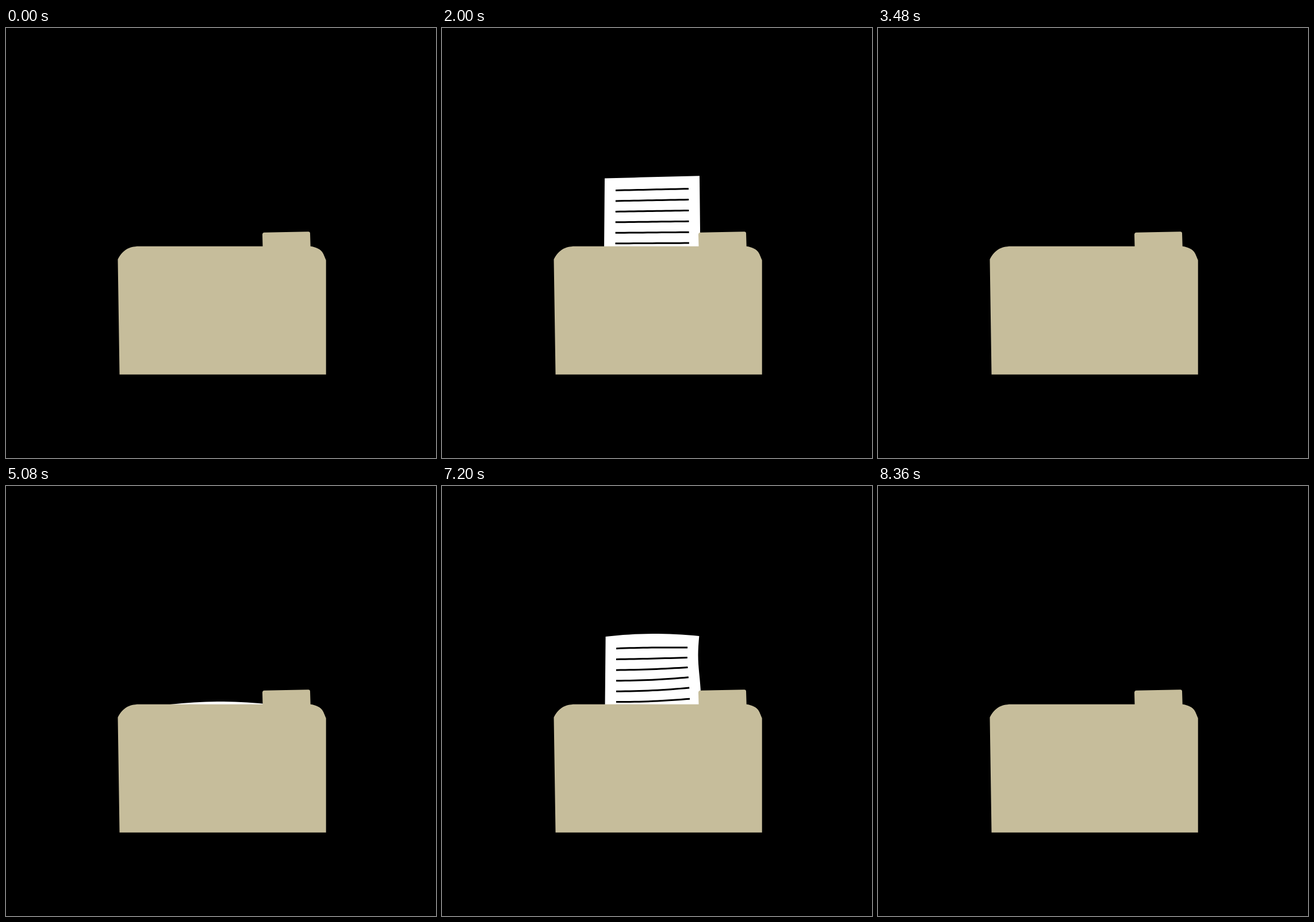
Write an HTML page with a canvas that moves like this. It is 748 px wide and 748 px high and loops after 9600 ms.

```html
<!DOCTYPE html>
<html lang="en">
<head>
<meta charset="utf-8">
<title>Folder</title>
<style>
html, body { margin: 0; width: 100%; height: 100%; overflow: hidden; background: #000; }
canvas { display: block; width: 748px; height: 748px; }
</style>
</head>
<body>
<canvas id="stage" width="748" height="748"></canvas>
<script>
const ctx = document.getElementById('stage').getContext('2d');
const LOOP = 9600, STEP = 40;
const HEIGHT = 215, LINES = 10, INSET = 0.116;
const RISE = 1900, LAUNCH = 2160, END = 3320;

const clamp = x => Math.max(0, Math.min(1, x));
const smooth = x => { x = clamp(x); return x * x * (3 - 2 * x); };
const mix = (a, b, k) => a + (b - a) * k;

// Each row of a sheet is a quadratic curve: x from left to right,
// y offset 0 at the left, bow in the middle, lift at the right.
function flatRow(v, s) {
  const k = smooth((s - 1000) / 840);
  const lift = -mix(2.6, 4.3, k) * Math.max(0, 1 - v / 145);
  const x = 285 - 2 * k;
  return { left: x - v * 0.008, right: x + mix(164, 165, k) + v * 0.011, bow: lift / 2, lift };
}

function curledRow(v, s) {
  const wave = Math.sin(v / 27 - 5.05 + s * 0.001);
  const curl = v < 180 ? Math.sin(Math.PI * v / 180) ** 2 : 0;
  return {
    left: 285.4 - 0.8 * smooth((s - 880) / 1280) - v * 0.009,
    right: 448 + 2.5 * wave,
    bow: -9.5 * Math.exp(-v / 25) + 1.5 * clamp(v / 80),
    lift: -1 - 7.2 * curl
  };
}

const sheets = [
  { start: 160, row: flatRow, low: 382, high: 261, power: 1.6,
    dx: -196, dy: -338, turn: -26, flight: 1370 },
  { start: 5040, row: curledRow, low: 384, high: 259, power: 1.5,
    dx: 209, dy: -319, turn: 40, flight: 1500 }
];

function pointAt(row, v, u) {
  return [mix(row.left, row.right, u), v + 2 * u * (1 - u) * row.bow + u * u * row.lift];
}

function traceRow(sheet, s, v, from, to) {
  const row = sheet.row(v, s);
  for (let i = 0; i <= 16; i++) ctx.lineTo(...pointAt(row, v, mix(from, to, i / 16)));
}

function traceEdge(sheet, s, u, from, to) {
  for (let i = 0; i <= 24; i++) {
    const v = mix(from, to, i / 24);
    ctx.lineTo(...pointAt(sheet.row(v, s), v, u));
  }
}

function drawSheet(sheet, s) {
  const rise = 1 - (1 - clamp(s / RISE)) ** sheet.power;
  const dip = 3 * smooth((s - RISE) / (LAUNCH - RISE));
  const top = mix(sheet.low, sheet.high, rise) + dip;
  const fly = smooth((s - LAUNCH) / sheet.flight) / smooth(800 / sheet.flight);
  const cx = 366, cy = HEIGHT / 2;

  ctx.save();
  ctx.translate(cx + sheet.dx * fly, top + cy + sheet.dy * fly);
  ctx.rotate(sheet.turn * fly * Math.PI / 180);
  ctx.translate(-cx, -cy);

  ctx.beginPath();
  traceRow(sheet, s, 0, 0, 1);
  traceEdge(sheet, s, 1, 0, HEIGHT);
  traceRow(sheet, s, HEIGHT, 1, 0);
  traceEdge(sheet, s, 0, HEIGHT, 0);
  ctx.closePath();
  ctx.fillStyle = '#fff';
  ctx.fill();

  ctx.strokeStyle = '#000';
  ctx.lineWidth = 3;
  for (let i = 0; i < LINES; i++) {
    ctx.beginPath();
    traceRow(sheet, s, 21.4 + 18.4 * i, INSET, 1 - INSET);
    ctx.stroke();
  }
  ctx.restore();
}

const folder = new Path2D(
  'M194.5 402.5C203 386 214 380 231 379.7L446.5 379.7L446 359.5Q446 356 449.5 355.7' +
  'L525.5 354.3Q529 354.2 529 357.5L529.7 379.7C539 381 547 385 550 389.5' +
  'C553 394 555 400 556.7 404L556.7 602.7L197.5 602.7Z');

function render(t) {
  ctx.fillStyle = '#000';
  ctx.fillRect(0, 0, 748, 748);
  for (const sheet of sheets) {
    const s = t - sheet.start;
    if (s >= 0 && s < END) drawSheet(sheet, s);
  }
  ctx.fillStyle = '#c6bd9b';
  ctx.fill(folder);
}

let origin;
function tick(now) {
  origin ??= now;
  const t = Math.max(0, now - origin) % LOOP;
  render(Math.floor(t / STEP) * STEP);
  requestAnimationFrame(tick);
}
render(0);
requestAnimationFrame(tick);
</script>
</body>
</html>
```
